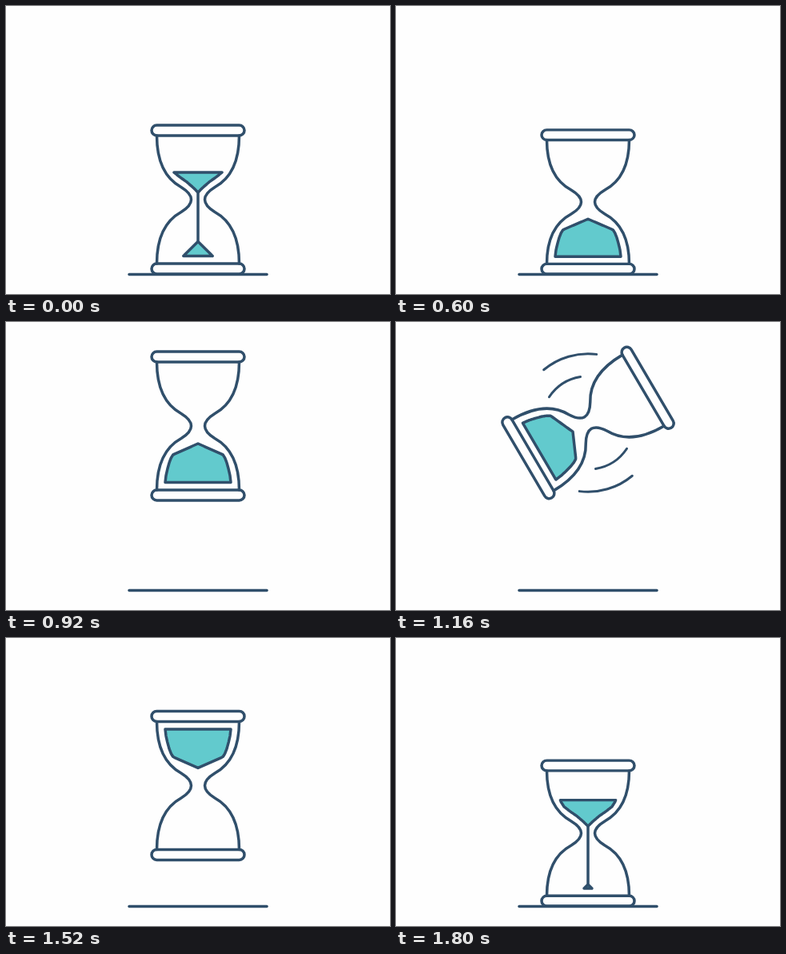
These frames come from a looping animation (480 px wide and 360 px high, 1.84 s). An HTML page with a canvas:

```html
<!DOCTYPE html>
<html lang="en">
<head>
<meta charset="utf-8">
<title>Hourglass</title>
<style>
html, body { margin: 0; width: 100%; height: 100%; overflow: hidden; background: #fefefe; }
canvas { display: block; }
</style>
</head>
<body>
<canvas id="stage" width="480" height="360"></canvas>
<script>
const ctx = document.getElementById("stage").getContext("2d");
const LOOP = 1840, STEP = 40;
const INK = "#304f6b", TEAL = "#62cacd";
const FLOOR = 335, HALF = 93;          // ground height, half the glass height
const BASE = 70.5, NECK = 9, HEAP = 22; // sand levels measured from the neck centre
const FLOW = 1692;                     // moment the sand starts to run

// Inner chamber: [distance from centre, half width]
const CHAMBER = [[9, 0], [15, 6], [22, 14], [28, 22.5], [34, 30], [40, 33.7],
  [46, 36], [54, 38.2], [62, 40], [70.5, 41]];

const mix = (a, b, u) => a + (b - a) * u;
const span = (t, a, b) => Math.min(1, Math.max(0, (t - a) / (b - a)));
const smooth = u => u * u * (3 - 2 * u);
const easeOut = (u, n) => 1 - (1 - u) ** n;
const inOut = u => u < 0.5 ? 4 * u ** 3 : 1 - 4 * (1 - u) ** 3;

function chamber(d) {
  const i = Math.max(1, CHAMBER.findIndex(p => p[0] >= d));
  const [d0, w0] = CHAMBER[i - 1], [d1, w1] = CHAMBER[i];
  return mix(w0, w1, span(d, d0, d1));
}

// Sand between a cone tip and a flat level, bounded by the chamber
function sand(tip, level, slope) {
  const n = 48, side = [];
  for (let i = 0; i <= n; i++) {
    const y = mix(tip, level, i / n);
    side.push([Math.min(chamber(Math.abs(y)), slope * Math.abs(y - tip)), y]);
  }
  ctx.beginPath();
  side.forEach(([x, y]) => ctx.lineTo(x, y));
  side.reverse().forEach(([x, y]) => ctx.lineTo(-x, y));
  ctx.closePath();
  ctx.fill();
  ctx.stroke();
}

function line(x0, y0, x1, y1) {
  ctx.beginPath();
  ctx.moveTo(x0, y0);
  ctx.lineTo(x1, y1);
  ctx.stroke();
}

function glass() {
  for (const sx of [-1, 1]) {
    ctx.beginPath();
    ctx.moveTo(51.5 * sx, -80);
    ctx.bezierCurveTo(51.5 * sx, -50, 42 * sx, -27, 21 * sx, -15.5);
    ctx.bezierCurveTo(12 * sx, -10, 8.5 * sx, -5, 8.5 * sx, 0);
    ctx.bezierCurveTo(8.5 * sx, 5, 12 * sx, 10, 21 * sx, 15.5);
    ctx.bezierCurveTo(42 * sx, 27, 51.5 * sx, 50, 51.5 * sx, 80);
    ctx.stroke();
  }
  for (const y of [-93, 80]) {
    ctx.beginPath();
    ctx.roundRect(-58, y, 116, 13, 6.5);
    ctx.stroke();
  }
}

function runningSand(t) {
  const level = mix(-BASE, -NECK, easeOut(span(t, FLOW, 2102), 2));
  const tip = mix(-HEAP, -NECK, smooth(span(t, FLOW, 1740)));
  const height = (BASE - HEAP) * easeOut(span(t, 1787, 2154), 3);
  const top = mix(tip, BASE - height, span(t, 2102, 2160) ** 2);
  const end = mix(tip, BASE - height, span(t, 1710, 1787) ** 2);
  if (end - top > 1) line(0, top, 0, end);
  if (tip - level > 1) sand(tip, level, 2.25);
  if (height > 1) sand(BASE - height, BASE, mix(1, 2.25, span(height, 18, 48.5)));
}

function whoosh(t) {
  const length = 47 * span(t, 1080, 1160) * (1 - span(t, 1225, 1373));
  if (!length) return;
  const rad = Math.PI / 180;
  ctx.lineWidth = 3;
  for (const [r, head] of [[86.3, 217.5], [58.3, 201]])
    for (const turn of [0, 180]) {
      ctx.beginPath();
      ctx.arc(0, 0, r, (head + turn - length) * rad, (head + turn) * rad);
      ctx.stroke();
    }
}

function draw(t) {
  const squash = 0.09 * (
    smooth(span(t, 560, 660)) - smooth(span(t, 660, 740)) +
    smooth(span(t, 1610, 1700)) - smooth(span(t, 1700, 1848)));
  const lift = 116 * (easeOut(span(t, 700, 1026), 3) - span(t, 1300, 1610) ** 2);
  const turn = 186.5 * inOut(span(t, 1048, 1308)) - 6.5 * smooth(span(t, 1308, 1460));
  const flowing = t < 560 || t >= FLOW;

  ctx.fillStyle = "#fefefe";
  ctx.fillRect(0, 0, 480, 360);
  ctx.strokeStyle = INK;
  ctx.fillStyle = TEAL;
  ctx.lineCap = ctx.lineJoin = "round";
  ctx.lineWidth = 3.5;
  line(154, 335.5, 326, 335.5);

  ctx.save();
  ctx.translate(240, FLOOR - lift);
  ctx.scale(1, 1 - squash);
  ctx.translate(0, -HALF);
  if (!flowing) ctx.rotate(turn * Math.PI / 180);
  if (flowing) runningSand(t < FLOW ? t + LOOP : t);
  else sand(HEAP, BASE, 2.25);
  glass();
  whoosh(t);
  ctx.restore();
}

function tick() {
  draw(Math.floor(performance.now() % LOOP / STEP) * STEP);
  requestAnimationFrame(tick);
}
tick();
</script>
</body>
</html>
```
